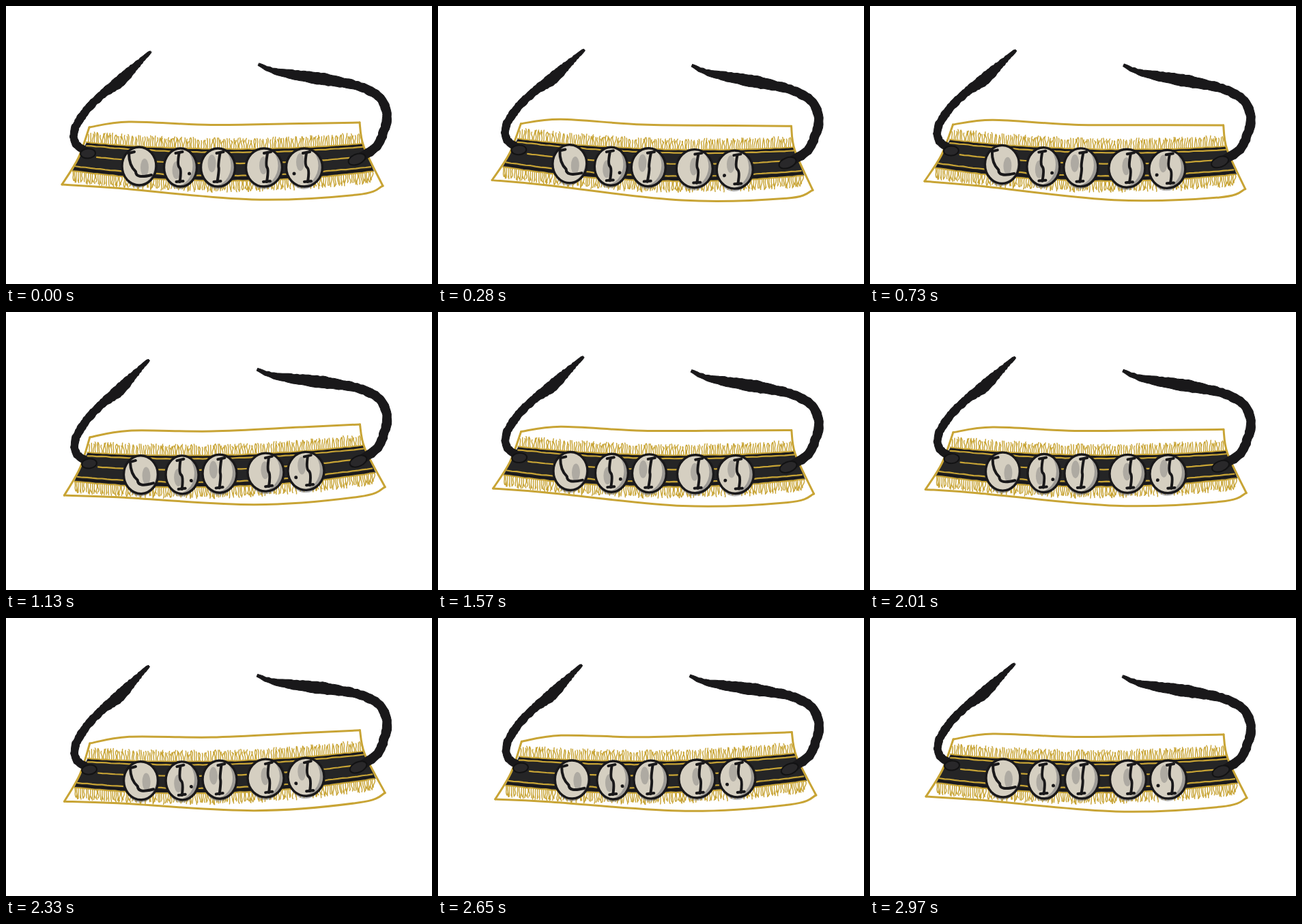
Recreate the animation shown at these times as an HTML page. Size 624x408 px, loop 3.01 s.

```html
<!DOCTYPE html>
<html lang="en">
<head>
<meta charset="utf-8">
<title>Swaying bell strap</title>
<style>
html, body { margin: 0; width: 100%; height: 100%; overflow: hidden; background: #fff; }
svg { display: block; width: 100vw; height: 100vh; }
path { stroke-linecap: round; stroke-linejoin: round; }
</style>
</head>
<body>
<svg viewBox="0 0 624 408"><g id="strap"></g></svg>
<script>
const NS = 'http://www.w3.org/2000/svg';
const GOLD = '#c8a435', BLACK = '#19181a', BAND = '#252526';
const strap = document.getElementById('strap');

function add(tag, attrs, parent = strap) {
  const el = document.createElementNS(NS, tag);
  for (const key in attrs) el.setAttribute(key, attrs[key]);
  parent.appendChild(el);
  return el;
}

const stroke = (d, color, width) => add('path', { d, fill: 'none', stroke: color, 'stroke-width': width });
const fill = (d, color) => add('path', { d, fill: color });

let seed = 11;
const random = () => (seed = (seed * 16807) % 2147483647) / 2147483647;
const jitter = size => (random() - 0.5) * 2 * size;

// Smooth curve through points (Catmull-Rom as cubic Béziers).
function curve(list) {
  const p = list.split(' ').map(pair => pair.split(',').map(Number));
  const at = i => p[Math.max(0, Math.min(p.length - 1, i))];
  let d = 'M' + p[0];
  for (let i = 0; i < p.length - 1; i++) {
    const [a, b, c, e] = [at(i - 1), at(i), at(i + 1), at(i + 2)];
    const c1 = b.map((v, k) => v + (c[k] - a[k]) / 6);
    const c2 = c.map((v, k) => v - (e[k] - b[k]) / 6);
    d += `C${c1} ${c2} ${c}`;
  }
  return d;
}

const bandTop = x => 210 - 0.00022 * (x - 330) ** 2;
const bandBottom = x => 256.5 - 0.00029 * (x - 320) ** 2;

// Hand-drawn line along an edge function.
function along(edge, from, to, shift = 0, rough = 0.4) {
  const points = [], steps = 60;
  for (let i = 0; i <= steps; i++) {
    const x = from + (to - from) * i / steps;
    points.push([x, edge(x) + shift + jitter(rough)]);
  }
  return 'M' + points.join('L');
}

function fringe(edge, from, to, direction) {
  let d = '';
  for (let x = from; x < to; x += 2.5 + random() * 0.8) {
    const len = direction * (12 + random() * 5), lean = jitter(2), bend = jitter(1.8);
    d += `M${x},${edge(x)}q${bend},${len * 0.3} ${lean * 0.3},${len * 0.55}t${lean * 0.7},${len * 0.45}`;
    if (random() < 0.25) d += `m${-lean * 0.7},${-len * 0.45}l${-lean},${len * 0.3}`;
  }
  stroke(d, GOLD, 1.45);
}

function drawCloth() {
  fringe(bandTop, 121, 522, -1);
  fringe(bandBottom, 98, 538, 1);
  fill(along(bandTop, 118, 523) + 'L' + along(bandBottom, 539, 97).slice(1) + 'Z', BAND);
  stroke(along(bandTop, 118, 522), GOLD, 1.9);
  stroke(along(bandTop, 119, 521, 2.2), BLACK, 2);
  stroke(along(bandTop, 118, 522, 4.8), GOLD, 2.2);
  stroke(along(x => (bandTop(x) + bandBottom(x)) / 2 - 2, 133, 503), GOLD, 2.2);
  stroke(along(bandBottom, 102, 534, -7.5), GOLD, 2.2);
  stroke(along(bandBottom, 101, 535, -3.5), BLACK, 2.8);
  stroke(along(bandBottom, 98, 537), GOLD, 2.1);
  const hem = [
    '122,178 180,170 300,174.5 430,172.5 518,171',
    '518,171 524,206 552,264',
    '552,264 514,277 360,284 160,267 82,262',
    '82,262 106,223 122,178'
  ];
  hem.forEach(line => stroke(curve(line), GOLD, 3));
}

const bells = [
  { x: 195, rx: 25, patch: [8, 2] },
  { x: 255.5, rx: 24, stem: -2, lean: 1, patch: [-6, 4], dot: 13 },
  { x: 310.5, rx: 25, stem: 3, lean: -4, patch: [-9, -6] },
  { x: 378, rx: 26.5, stem: 5, lean: -1, patch: [-1, -3] },
  { x: 437, rx: 26.5, stem: 3, lean: 2, patch: [-6, -8], dot: -15 }
];

function drawBell({ x, rx, stem, lean, patch, dot }, i) {
  const hooked = stem === undefined, y = hooked ? 235 : 237, ry = 28;
  const clip = add('clipPath', { id: 'bell' + i });
  add('ellipse', { cx: x, cy: y, rx, ry }, clip);
  add('ellipse', { cx: x - 1, cy: y + 4, rx: rx - 2, ry, fill: '#777', 'fill-opacity': 0.55 });
  const face = add('g', { 'clip-path': `url(#bell${i})` });
  const shade = (dx, dy, rx, ry, color) => add('ellipse', { cx: x + dx, cy: y + dy, rx, ry, fill: color }, face);
  shade(0, 0, rx, ry, '#9d9a95');
  shade(hooked ? -2 : -6, -3, rx, ry + 2, '#d5cfc1');
  shade(...patch, 6, 13, '#aeaaa2');
  add('ellipse', { cx: x, cy: y, rx, ry, fill: 'none', stroke: BLACK, 'stroke-width': 3.4 });
  if (hooked) {
    stroke(`M${x - 7},${y - 21}l-8,2q0,18 10,27q0,11 23,5`, BLACK, 4);
  } else {
    const sx = x + stem;
    stroke(`M${sx},${y - 21}q-3,18 ${lean / 2},21t${lean / 2},21`, BLACK, 4);
    stroke(`M${sx - 5},${y - 21}l10,-2M${sx + lean - 5},${y + 21}l10,-1`, BLACK, 4);
  }
  if (dot) add('circle', { cx: x + dot, cy: y + 9, r: 2.5, fill: BLACK });
}

// Tapered ribbon that swells about a third of the way along its spine.
function drawCord(spine, thickness, swell) {
  const path = stroke(curve(spine), 'none', 0), length = path.getTotalLength();
  const sides = [[], []], steps = 70;
  for (let i = 0; i <= steps; i++) {
    const u = i / steps, s = u * length;
    const p = path.getPointAtLength(s);
    const a = path.getPointAtLength(Math.max(0, s - 2)), b = path.getPointAtLength(Math.min(length, s + 2));
    const angle = Math.atan2(b.y - a.y, b.x - a.x);
    const half = thickness * Math.min(1, 0.3 + 4 * u) + swell * Math.exp(-(((u - 0.31) / 0.1) ** 2));
    [1, -1].forEach((sign, k) => {
      const h = sign * (half + jitter(0.6));
      sides[k].push([p.x - Math.sin(angle) * h, p.y + Math.cos(angle) * h]);
    });
  }
  path.remove();
  const d = 'M' + sides[0].join('L') + 'L' + sides[1].reverse().join('L') + 'Z';
  add('path', { d, fill: BLACK, stroke: BLACK, 'stroke-width': 1 });
}

function drawKnot(x, y, rx, ry, turn) {
  add('ellipse', {
    cx: x, cy: y, rx, ry, transform: `rotate(${turn} ${x} ${y})`,
    fill: '#29282a', stroke: '#121213', 'stroke-width': 2
  });
}

drawCloth();
bells.forEach(drawBell);
drawCord('212,67 195,83 166,111 142,129 118,153 101,180 102,202 122,216', 5.6, 2.6);
drawCord('370,86 395,96 435,103 480,110 520,119 548,135 558,160 553,185 542,207 515,225', 6.4, 2.2);
drawKnot(120, 216.5, 11, 7, -5);
drawKnot(514, 225, 13, 7.5, -22);

const LOOP = 3010, STEP = 40, RISE_END = 320, HOLD_END = 610;
const HIGH = 1.6, LOW = -1.8, HALF_SWING = 590, SETTLE = 4 * HALF_SWING, REST = 2970;

function ease(from, to, u) {
  return from + (to - from) * (1 - Math.cos(Math.PI * Math.min(1, u))) / 2;
}

// Tilt in degrees: rise and hold, three half swings, then settle level.
function tilt(t) {
  if (t < HALF_SWING) return ease(0, HIGH, t / RISE_END);
  if (t >= SETTLE) return ease(LOW, 0, (t - SETTLE) / (REST - SETTLE));
  return ease(HIGH, LOW, 0.5 + 0.5 * 0) + (HIGH - LOW) / 2 * Math.cos(Math.PI * (t / HALF_SWING - 1));
}

function stepped(t) {
  if (t < HOLD_END) return Math.min(RISE_END, Math.floor(t / STEP) * STEP);
  return HOLD_END + Math.floor((t - HOLD_END) / STEP) * STEP;
}

function render(t) {
  strap.setAttribute('transform', `rotate(${tilt(stepped(t % LOOP)).toFixed(3)} 318 155)`);
}

const start = performance.now();
function tick() {
  render(performance.now() - start);
  requestAnimationFrame(tick);
}
render(0);
requestAnimationFrame(tick);
</script>
</body>
</html>
```
